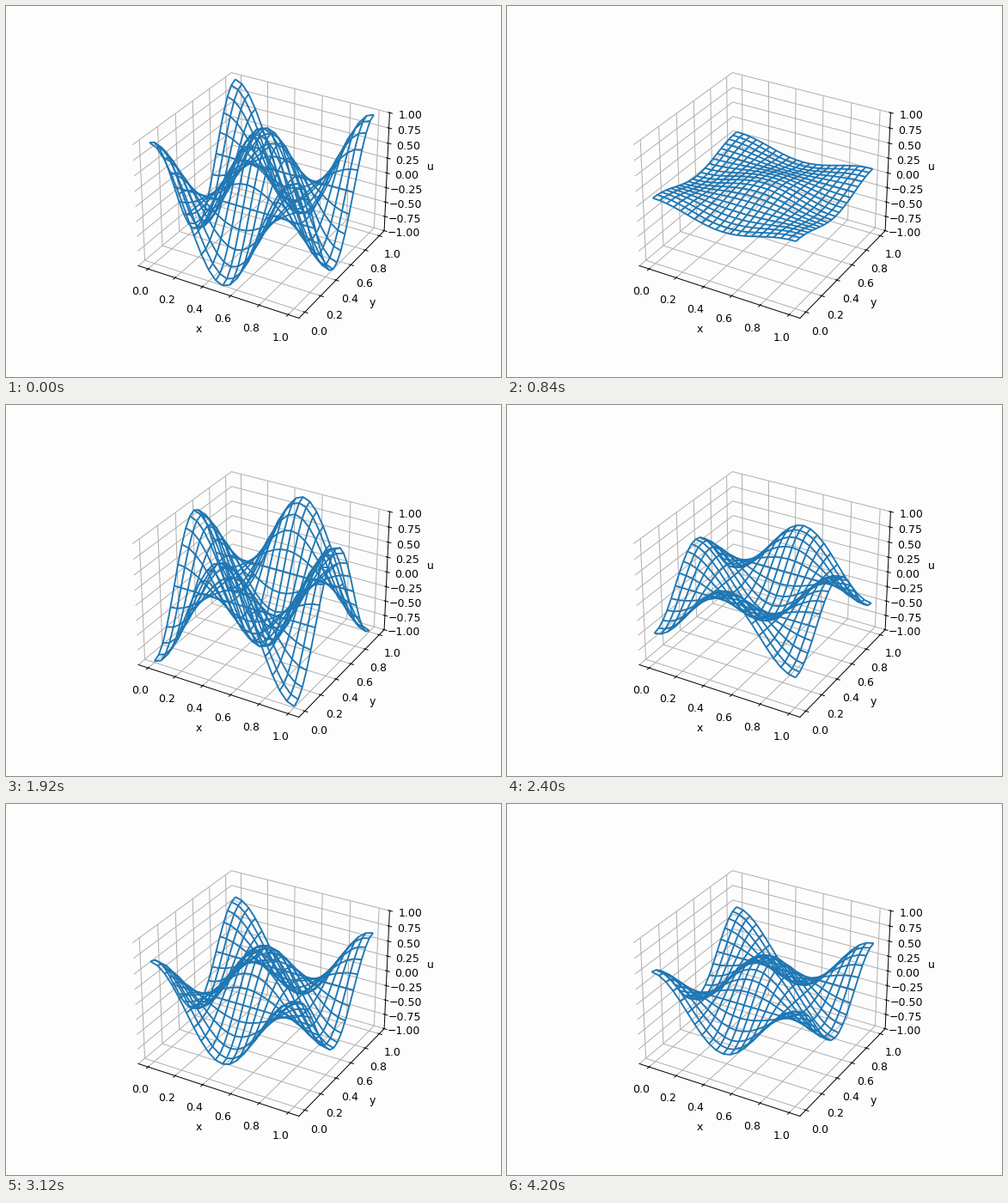
These frames come from a looping animation (576x432 px, 4320 ms). A matplotlib script:

```python
import numpy as np
import matplotlib.pyplot as plt
from matplotlib.animation import FuncAnimation

FRAMES = 36
INTERVAL = 120
PERIOD = 30  # frames per oscillation of the standing wave
CELLS = 20
PAPER = "#fdfdfd"

fig = plt.figure(figsize=(6.4, 4.8), dpi=90, facecolor=PAPER)
ax = fig.add_subplot(projection="3d", facecolor=PAPER)
for axis in (ax.xaxis, ax.yaxis, ax.zaxis):
    axis.set_pane_color((1, 1, 1, 0))

grid = np.linspace(0, 1, CELLS + 1)
X, Y = np.meshgrid(grid, grid)
MODE = np.cos(2 * np.pi * X) * np.cos(2 * np.pi * Y)


def draw_wave(frame):
    u = MODE * np.cos(2 * np.pi * frame / PERIOD)
    return ax.plot_wireframe(X, Y, u, rstride=1, cstride=1)


wave = draw_wave(0)
ax.set_zlim(-1, 1)
ax.set_xlabel("x")
ax.set_ylabel("y")
ax.set_zlabel("u")


def update(frame):
    global wave
    wave.remove()
    wave = draw_wave(frame)
    return [wave]


anim = FuncAnimation(fig, update, frames=FRAMES, interval=INTERVAL,
                     repeat=True, repeat_delay=0)
plt.show()
```
